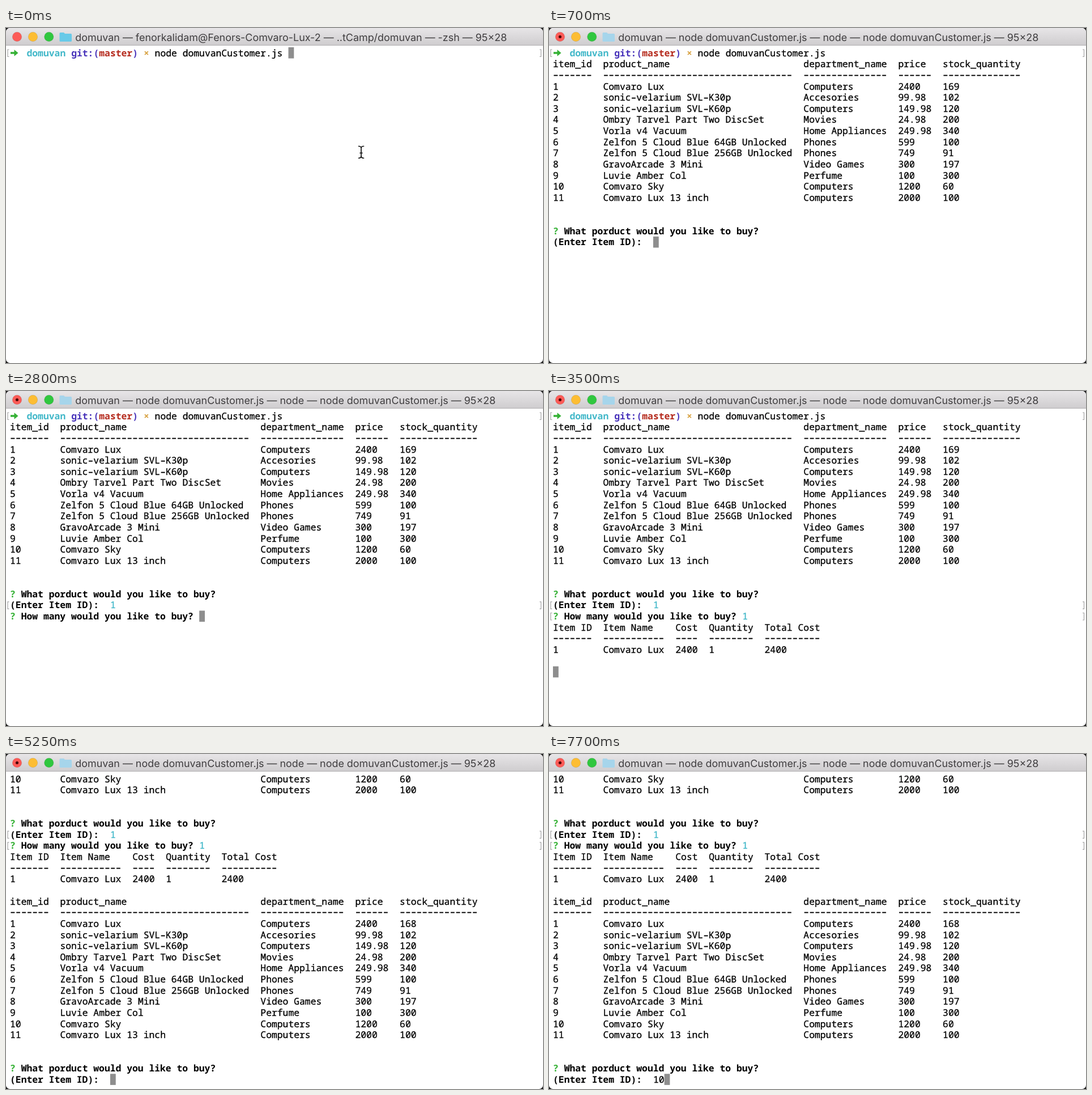
Animation of 948x591 px, one loop 8000 ms. Source, as an HTML page:

```html
<!DOCTYPE html>
<html lang="en">
<head>
<meta charset="utf-8">
<title>Terminal</title>
<style>
  html, body { margin: 0; width: 100%; height: 100%; overflow: hidden; background: #161616; }
  svg { display: block; width: 948px; height: 591px; }
  text { white-space: pre; text-rendering: geometricPrecision; }
  #screen { font: 16.38px "Noto Sans Mono", "DejaVu Sans Mono", monospace; fill: #000; }
  #screen text { stroke-width: .3; }
  #screen .b { font-weight: 700; stroke: none; }
  #bar text { font: 17.92px Inter, Roboto, sans-serif; fill: #3f3d3f; }
  #bar circle { stroke: #000; stroke-opacity: .1; }
  .mark { fill: none; stroke: #a6a6a6; stroke-width: 1.2; }
</style>
</head>
<body>
<svg viewBox="0 0 948 591">
  <defs>
    <linearGradient id="chrome" x1="0" y1="0" x2="0" y2="1">
      <stop offset="0" stop-color="#e7e5e7"/>
      <stop offset="1" stop-color="#cfcdcf"/>
    </linearGradient>
    <clipPath id="window"><rect width="948" height="591" rx="7"/></clipPath>
  </defs>
  <g clip-path="url(#window)">
    <rect width="948" height="591" fill="#fff"/>
    <g id="screen"><rect id="cursor" width="9.8" height="19.6" fill="#8e8e8e"/></g>
    <g id="bar">
      <rect width="948" height="30" fill="url(#chrome)"/>
      <rect y="30" width="948" height="1" fill="#b0aeb0"/>
      <circle cx="19.5" cy="15.5" r="8.2" fill="#fc5b57"/>
      <circle id="busy" cx="19.5" cy="15.5" r="2.5" fill="#4a0404"/>
      <circle cx="47.5" cy="15.5" r="8.2" fill="#fdbd33"/>
      <circle cx="75.8" cy="15.5" r="8.2" fill="#30c73f"/>
      <path id="folder" d="M94.5 9.5q0-1.5 1.5-1.5h6l2 2h10.5q1.5 0 1.5 1.5v11q0 1.5-1.5 1.5h-18.5q-1.5 0-1.5-1.5z"/>
      <text id="title" x="122.3" y="22.5"></text>
    </g>
    <g id="pointer" fill="none" stroke-linecap="round">
      <path id="beam" d="M622.5 208.5q4 0 4.5 3q.5-3 4.5-3M627 211.5v15M622.5 229.5q4 0 4.5-3q.5 3 4.5 3M625 220.5h4" stroke="#111" stroke-width="1.7"/>
    </g>
  </g>
</svg>
<script>
const LOOP = 8000, CELL = 9.83, LINE = 19.64, LEFT = 7, TOP = 34;
const NS = 'http://www.w3.org/2000/svg';
const $ = id => document.getElementById(id);
const terminal = $('screen'), cursor = $('cursor');
const timed = [];

const GREEN = '#35b135', CYAN = '#43b8c9', BLUE = '#4833ba', RED = '#b52b1e', GOLD = '#d8a344';

// Adds an SVG node that is visible from a time to the end of the loop.
function add(tag, attrs, from) {
  const el = document.createElementNS(NS, tag);
  for (const key in attrs) el.setAttribute(key, attrs[key]);
  terminal.insertBefore(el, cursor);
  timed.push({ el, from });
  return el;
}

function put(from, col, row, str, fill = '#000', bold = false) {
  add('text', {
    x: LEFT + col * CELL, y: TOP + row * LINE + 15.6, fill, stroke: fill, class: bold ? 'b' : ''
  }, from).textContent = str;
}

function brackets(from, row) {
  const y = TOP + row * LINE + 4;
  add('path', { class: 'mark', d: `M5.5 ${y}h-2.5v12.5h2.5M942 ${y}h2.5v12.5h-2.5` }, from);
}

function table(from, row, cols, heads, widths, rows) {
  const line = (cells, at) => cells.forEach((cell, c) => put(from, cols[c], at, cell));
  line(heads, row);
  line(widths.map(n => '–'.repeat(n)), row + 0.95); // rules sit slightly high
  rows.forEach((cells, i) => line(cells.map(s => s.replace(/-/g, '–')), row + 2 + i));
}

function inventory(from, row, stock) {
  const items = [
    `Comvaro Lux|Computers|2400|${stock}`,
    'sonic-velarium SVL-K30p|Accesories|99.98|102',
    'sonic-velarium SVL-K60p|Computers|149.98|120',
    'Ombry Tarvel Part Two DiscSet|Movies|24.98|200',
    'Vorla v4 Vacuum|Home Appliances|249.98|340',
    'Zelfon 5 Cloud Blue 64GB Unlocked|Phones|599|100',
    'Zelfon 5 Cloud Blue 256GB Unlocked|Phones|749|91',
    'GravoArcade 3 Mini|Video Games|300|197',
    'Luvie Amber Col|Perfume|100|300',
    'Comvaro Sky|Computers|1200|60',
    'Comvaro Lux 13 inch|Computers|2000|100'
  ].map((line, i) => [String(i + 1), ...line.split('|')]);
  table(from, row, [0, 9, 45, 62, 70],
    ['item_id', 'product_name', 'department_name', 'price', 'stock_quantity'],
    [7, 34, 15, 6, 14], items);
  put(from, 0, row + 15, '?', GREEN, true);
  put(from, 2, row + 15, 'What porduct would you like to buy?', '#000', true);
  put(from, 0, row + 16, '(Enter Item ID):', '#000', true);
}

// Shell prompt
brackets(0, 0);
add('path', { d: 'M8 42.3h6.5v-4l7 5.7-7 5.7v-4h-6.5z', fill: GREEN }, 0);
put(0, 3, 0, 'domuvan', CYAN, true);
put(0, 11, 0, 'git:(', BLUE, true);
put(0, 16, 0, 'master', RED, true);
put(0, 22, 0, ')', BLUE, true);
put(0, 24, 0, '×', GOLD, true);
put(0, 26, 0, 'node domuvanCustomer.js');

// First order
inventory(700, 1, 169);
brackets(2450, 17);
put(2450, 18, 17, '1', CYAN);
put(2450, 0, 18, '?', GREEN, true);
put(2450, 2, 18, 'How many would you like to buy?', '#000', true);
brackets(3500, 18);
put(3500, 34, 18, '1', CYAN);
table(3500, 19, [0, 9, 22, 28, 38],
  ['Item ID', 'Item Name', 'Cost', 'Quantity', 'Total Cost'],
  [7, 11, 4, 8, 10], [['1', 'Comvaro Lux', '2400', '1', '2400']]);

// Second order
inventory(3850, 23, 168);
put(7700, 18, 39, '10');

// White edge behind the mouse pointer
const halo = $('beam').cloneNode();
halo.removeAttribute('id');
halo.setAttribute('stroke', '#fff');
halo.setAttribute('stroke-width', 3.5);
$('pointer').prepend(halo);

const cursorStops = [
  [0, 50, 0], [350, 0, 1], [700, 18, 17], [2450, 34, 18],
  [3500, 0, 23], [3850, 18, 39], [7700, 20, 39]
];
const titles = [
  'domuvan — fenorkalidam@Fenors-Comvaro-Lux-2 — ..tCamp/domuvan — -zsh — 95×28',
  'domuvan — node domuvanCustomer.js — node — node domuvanCustomer.js — 95×28'
];

const show = (el, on) => el.setAttribute('visibility', on ? 'visible' : 'hidden');

function draw(t) {
  for (const { el, from } of timed) show(el, t >= from);
  const [, col, row] = cursorStops.filter(stop => t >= stop[0]).pop();
  cursor.setAttribute('x', LEFT + col * CELL);
  cursor.setAttribute('y', TOP + row * LINE);
  terminal.setAttribute('transform', `translate(0 ${t >= 3850 ? -12 * LINE : 0})`);

  const running = t >= 350;
  $('title').textContent = titles[+running];
  $('folder').setAttribute('fill', running ? '#a6d5eb' : '#68cae8');
  show($('busy'), running);
  show($('pointer'), !running);
}

function tick() {
  draw(performance.now() % LOOP);
  requestAnimationFrame(tick);
}
tick();
</script>
</body>
</html>
```
